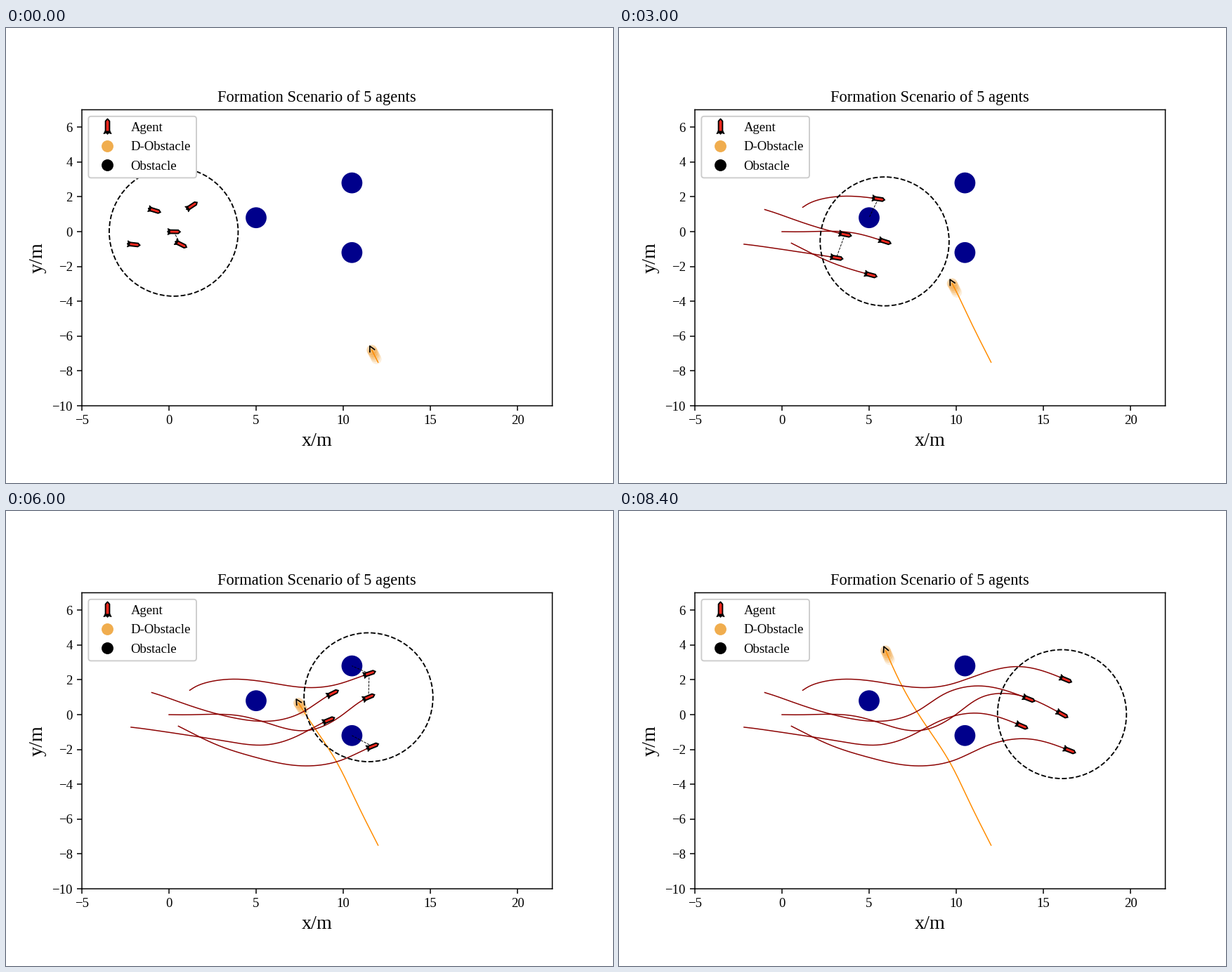
These frames come from a looping animation (864 px wide and 648 px high, 8450 ms). A matplotlib script:

```python
from itertools import combinations, product

import numpy as np
import matplotlib.pyplot as plt
from matplotlib.animation import FuncAnimation
from matplotlib.collections import LineCollection
from matplotlib.lines import Line2D
from matplotlib.patches import Circle, Polygon
from matplotlib.path import Path

FRAMES, INTERVAL = 169, 50
PX = 1 / 24.8        # one pixel in metres
NEAR = 1.5           # distance at which a link is shown
FINE = 2             # path samples per frame

plt.rcParams.update({"font.family": "Liberation Serif", "path.snap": False})


def spline(t, p, q):
    """Natural cubic spline through points p at times t, evaluated at q."""
    t, p, n = np.array(t, float), np.array(p, float), len(t)
    h, a, b = np.diff(t), np.eye(n), np.zeros((n, 2))
    for i in range(1, n - 1):
        a[i, i - 1:i + 2] = h[i - 1], 2 * (h[i - 1] + h[i]), h[i]
        b[i] = 6 * ((p[i + 1] - p[i]) / h[i] - (p[i] - p[i - 1]) / h[i - 1])
    m = np.linalg.solve(a, b)
    i = np.clip(np.searchsorted(t, q) - 1, 0, n - 2)
    u, v, w = ((x)[:, None] for x in (t[i + 1] - q, q - t[i], h[i]))
    return ((m[i] * u**3 + m[i + 1] * v**3) / (6 * w)
            + (p[i] / w - m[i] * w / 6) * u
            + (p[i + 1] / w - m[i + 1] * w / 6) * v)


class Track:
    """Smooth motion through a few key positions."""

    def __init__(self, times, xs, ys):
        self.start = times[0]
        q = np.arange(self.start, FRAMES, 1 / FINE)
        self.path = spline(times, np.c_[xs, ys], q)
        d = np.gradient(self.path, axis=0)
        self.dir = d / np.hypot(*d.T)[:, None]

    def at(self, n):
        i = (n - self.start) * FINE
        return self.path[i], self.dir[i], self.path[:i + 1]


KEYS = [-4, 16, 41, 60, 79, 102, 120, 139, 168]
tracks = [Track(KEYS, xs, ys) for xs, ys in [
    ([0, 1.48, 4.03, 5.89, 7.79, 9.93, 11.45, 13.36, 16.07],
     [0, 0, -.06, -.56, -.92, -.03, 1, 1.16, .03]),
    ([-.99, -.16, 1.71, 3.61, 5.6, 7.8, 9.38, 11.31, 14.15],
     [1.27, 1, .35, -.16, -.38, .22, 1.22, 1.65, .91]),
    ([1.19, 1.88, 3.69, 5.52, 7.4, 9.66, 11.49, 13.47, 16.27],
     [1.4, 1.76, 2.04, 1.88, 1.59, 1.74, 2.36, 2.76, 2.02]),
    ([.54, 1.33, 3.15, 5.08, 7.2, 9.82, 11.67, 13.73, 16.49],
     [-.66, -1.06, -1.89, -2.48, -2.91, -2.64, -1.82, -1.38, -2.05]),
    ([-2.18, -1.29, 1.03, 3.12, 5.28, 7.52, 9.15, 11.05, 13.75],
     [-.72, -.83, -1.17, -1.5, -1.75, -1.15, -.32, .09, -.64]),
]]
mover = Track([-11, 28, 67, 102, 139, 168],
              [12, 10.76, 9.52, 8.12, 6.8, 5.95],
              [-7.5, -5.02, -2.54, -.41, 1.82, 3.67])
rocks = np.array([(5, .8), (10.5, 2.8), (10.5, -1.2)])


def mirror(points):
    """Close a half outline by reflecting it in the x axis."""
    return np.array(points + [(x, -y) for x, y in points[::-1] if y], float)


# Rocket outlines in pixels, nose towards +x: shape, fill, edge width.
PARTS = [(mirror([(-4.5, 2.4), (-8.4, 4.5), (-7.4, 1.6), (-9, 0)]), "black", .6),
         (mirror([(-5.8, 2.4), (6.5, 2.4), (9.2, 0)]), "#f0281e", 1)]
BARBS = np.array([(-1, 3.75), (6.5, 0), (-1, -3.75)])

fig, ax = plt.subplots(figsize=(6.4, 4.8), dpi=135)
ax.set(xlim=(-5, 22), ylim=(-10, 7), aspect="equal")
ax.set_xticks(range(-5, 21, 5))
ax.set_yticks(range(-10, 7, 2))
ax.set_title("Formation Scenario of 5 agents")
ax.set_xlabel("x/m", fontsize=15)
ax.set_ylabel("y/m", fontsize=15)


def line(color, width, z):
    return ax.plot([], [], color=color, lw=width, zorder=z)[0]


for c in rocks:
    ax.add_patch(Circle(c, .6, color="darkblue", lw=0))
ghosts = [ax.add_patch(Circle((0, 0), .3, fc="#f09c30", lw=0, alpha=a, zorder=2))
          for a in np.linspace(.16, .38, 5)]
route = line("darkorange", .8, 2.5)
arrow = line("black", .9, 4)
trails = [line("darkred", .8, 2.6) for _ in tracks]
links = ax.add_collection(LineCollection([], colors="black", linewidths=.5,
                                         linestyles="--", zorder=3))
ring = ax.add_patch(Circle((0, 0), 3.7, fill=False, ls="--", lw=1, zorder=3))
rockets = [[ax.add_patch(Polygon(v, fc=c, ec="black", lw=w, zorder=4))
            for v, c, w in PARTS] for _ in tracks]


def turn(points, d):
    """Rotate pixel offsets so +x follows d, in metres."""
    return points @ np.array([d, (-d[1], d[0])]) * PX


def marker(shape, size, color, edge=0):
    return Line2D([], [], ls="", marker=shape, ms=size, mfc=color, mec="black", mew=edge)


def rocket_marker(v, color, edge):
    upright = np.c_[-v[:, 1], v[:, 0]]
    path = Path(np.vstack([upright, upright[:1]]), closed=True)
    return marker(path, 2.4 * np.abs(v).max() * 72 / fig.dpi, color, edge)


ax.legend([tuple(rocket_marker(*p) for p in PARTS),
           marker("o", 9, "#f0ad4e"), marker("o", 9, "black")],
          ["Agent", "D-Obstacle", "Obstacle"], loc="upper left",
          framealpha=1, labelspacing=.545, borderpad=.42)


def update(n):
    agents = []
    for track, trail, rocket in zip(tracks, trails, rockets):
        pos, d, past = track.at(n)
        agents.append(pos)
        trail.set_data(*past.T)
        for patch, (v, _, _) in zip(rocket, PARTS):
            patch.set_xy(pos + turn(v, d))
    ring.center = agents[0]

    head, d, past = mover.at(n)
    route.set_data(*past.T)
    arrow.set_data(*(head + turn(BARBS, d)).T)
    for ghost, lag in zip(ghosts, range(8, -1, -2)):
        ghost.center = mover.at(n - lag)[0]

    pairs = [*combinations(agents, 2), *product(agents, [*rocks, head])]
    links.set_segments([p for p in pairs if np.hypot(*(p[0] - p[1])) < NEAR])
    return []


anim = FuncAnimation(fig, update, frames=FRAMES, interval=INTERVAL,
                     init_func=lambda: update(0), repeat=True, repeat_delay=0)
plt.show()
```
